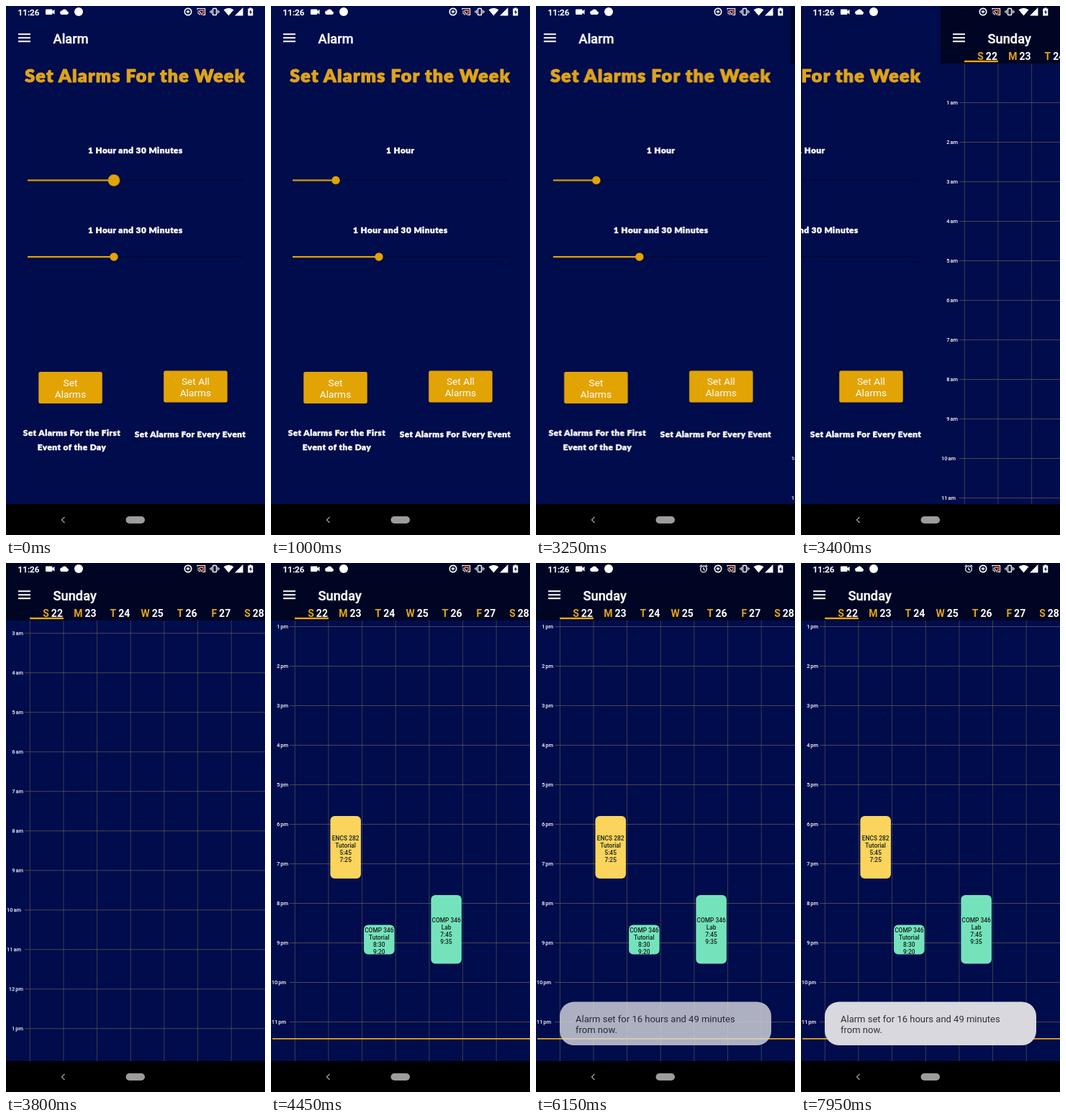
Recreate the animation shown at these times as an HTML page. Size 360 by 736 pixels, loop 8000 ms.

```html
<!DOCTYPE html>
<html lang="en">
<head>
<meta charset="utf-8">
<title>Weekly alarms</title>
<style>
html, body { margin: 0; width: 100%; height: 100%; overflow: hidden; background: #000; }
svg { display: block; width: 360px; height: 736px; font-family: Roboto, sans-serif; }
.round { font-family: Lato, "Open Sans", sans-serif; font-weight: 900; font-size: 11.8px; letter-spacing: .04em;
  fill: #fff; stroke: #fff; stroke-width: .5; stroke-linejoin: round; text-anchor: middle; }
.title { font-size: 25px; letter-spacing: .05em; fill: #dfa31b; stroke: #dfa31b; stroke-width: 1.1; }
.bar { font-size: 18.3px; font-weight: 500; fill: #fff; stroke: #fff; stroke-width: .35; }
.button { font-size: 13.7px; fill: #fff; text-anchor: middle; }
.day { font-size: 14px; font-weight: 700; fill: #fff; text-anchor: end; }
.day .letter { fill: #dfa31b; }
.hour { font-size: 7.5px; font-weight: 500; fill: #fff; text-anchor: end; }
.event { font-size: 8.4px; font-weight: 500; fill: #15201c; text-anchor: middle; }
.gold { fill: #e2a405; }

#pages, #scroll, #alarmIcon, #toast, .fill, .thumb, .label { animation: 8s linear infinite; }
.fill, .thumb, .label, #alarmIcon { animation-timing-function: step-end; }

#pages { animation-name: slide; }
@keyframes slide {
  0%, 40.27% { transform: none; animation-timing-function: cubic-bezier(.333, 0, .667, 1); }
  45%, 100% { transform: translateX(-360px); }
}
#scroll { animation-name: scroll; }
@keyframes scroll {
  0%, 45.25% { transform: none; animation-timing-function: cubic-bezier(.4, 0, .75, .6); }
  47.5% { transform: translateY(-145px); animation-timing-function: cubic-bezier(.33, .42, .6, 1); }
  52.5%, 100% { transform: translateY(-706px); }
}

#first .fill { animation-name: fill1; }
#first .thumb { animation-name: thumb1; }
#first .before { animation-name: hide1; }
#first .after { animation-name: show1; }
@keyframes fill1 { 0% { transform: scaleX(.4); } 6%, 100% { transform: scaleX(.2); } }
@keyframes thumb1 {
  0% { transform: translateX(120px) scale(1.45); }
  6% { transform: translateX(60px) scale(1.45); }
  11.25%, 100% { transform: translateX(60px); }
}
@keyframes hide1 { 0% { opacity: 1; } 6%, 100% { opacity: 0; } }
@keyframes show1 { 0% { opacity: 0; } 6%, 100% { opacity: 1; } }

#second .fill { animation-name: fill2; }
#second .thumb { animation-name: thumb2; }
#second .before { animation-name: hide2; }
#second .after { animation-name: show2; }
@keyframes fill2 {
  0% { transform: scaleX(.4); } 19.5% { transform: scaleX(.6); } 29.5%, 100% { transform: scaleX(.4); }
}
@keyframes thumb2 {
  0% { transform: translateX(120px); }
  16.5% { transform: translateX(120px) scale(1.45); }
  19.5% { transform: translateX(180px) scale(1.45); }
  29.5% { transform: translateX(120px) scale(1.45); }
  33%, 100% { transform: translateX(120px); }
}
@keyframes hide2 { 0% { opacity: 1; } 19.5% { opacity: 0; } 29.5%, 100% { opacity: 1; } }
@keyframes show2 { 0% { opacity: 0; } 19.5% { opacity: 1; } 29.5%, 100% { opacity: 0; } }

#alarmIcon { animation-name: ring; }
@keyframes ring { 0% { opacity: 0; } 69.5%, 100% { opacity: 1; } }
#toast { animation-name: toast; }
@keyframes toast { 0%, 74.75% { opacity: 0; } 77.4%, 100% { opacity: 1; } }
</style>
</head>
<body>
<svg viewBox="0 0 360 736">
  <defs>
    <path id="menu" d="M17 39.2H34M17 44.2H34M17 49.2H34" stroke="#fff" stroke-width="1.9"/>
  </defs>

  <g id="pages">
    <g id="alarmPage">
      <rect width="360" height="693" fill="#000c4b"/>
      <use href="#menu"/>
      <text class="bar" x="65.5" y="52">Alarm</text>
      <text class="round title" x="179.6" y="106">Set Alarms For the Week</text>
      <text class="round" x="91.5" y="597.5">Set Alarms For the First</text>
      <text class="round" x="91.5" y="617.5">Event of the Day</text>
      <text class="round" x="256" y="600">Set Alarms For Every Event</text>
    </g>
    <g transform="translate(360 0)">
      <rect width="360" height="693" fill="#000c4c"/>
      <path id="columns" stroke="#79714f" stroke-opacity=".5"/>
      <g id="scroll"></g>
      <g id="calendarHead">
        <rect width="360" height="80" fill="#000523"/>
        <use href="#menu"/>
        <text class="bar" x="65.5" y="52">Sunday</text>
        <rect x="33" y="75.8" width="47" height="2.4" fill="#eda610"/>
      </g>
    </g>
  </g>

  <g id="toast">
    <rect x="33" y="610.5" width="294" height="60.5" rx="20" fill="#d8d8de"/>
    <g font-size="13" fill="#303036">
      <text x="55" y="638.5">Alarm set for 16 hours and 49 minutes</text>
      <text x="55" y="653.5">from now.</text>
    </g>
  </g>

  <g id="status" fill="#fff">
    <text x="16.5" y="13" font-size="11.8" font-weight="500" stroke="#fff" stroke-width=".3">11:26</text>
    <path d="M56 4.5h7.5q1 0 1 1v1.7l3-2.5v7l-3-2.5v1.7q0 1-1 1H56q-1 0-1-1V5.5q0-1 1-1z"/>
    <path d="M78 12a2.7 2.7 0 0 1-.3-5.4A4 4 0 0 1 85 7.3a2.4 2.4 0 0 1 .1 4.7z"/>
    <circle cx="101" cy="8" r="6"/>
    <g id="alarmIcon" fill="none" stroke="#fff" stroke-width="1.2">
      <circle cx="233" cy="8.5" r="4.3"/>
      <path d="M233 6v2.8l2 1.3M227.8 5l2.5-2.2M238.2 5l-2.5-2.2"/>
    </g>
    <g fill="none" stroke="#fff">
      <circle cx="253" cy="8" r="4.7" stroke-width="1.7"/>
      <path d="M250.7 8h4.6M253 5.7v4.6" stroke-width="1.3"/>
      <path d="M266 5V3.500h10.500v9H273" stroke-width="1.2"/>
      <path d="M266 7a5.5 5.5 0 0 1 5.5 5.5M266 9.5a3 3 0 0 1 3 3" stroke-width="1.2"/>
      <path d="M268.5 6h5.5v4.5h-2" stroke="#e8673c" stroke-width="1.8"/>
      <rect x="287.5" y="3.5" width="5" height="9" rx=".8" stroke-width="1.4"/>
      <path d="M285.5 5.5v5M294.5 5.5v5M283.8 6.8v2.4M296.2 6.8v2.4" stroke-width="1.1"/>
    </g>
    <path d="M302.5 5.3Q309.5 .2 316.5 5.3L309.5 13.5z"/>
    <path d="M318 13.5L329.5 2v11.5z"/>
    <path d="M338.3 2.5h3v1h2v10h-7v-10h2z"/>
    <path d="M340.5 5l-2.5 4h1.6v3l2.4-4h-1.5z" fill="#000b4a"/>
  </g>

  <rect y="693" width="360" height="43"/>
  <path d="M81.5 711l-4 4 4 4" fill="none" stroke="#999" stroke-width="1.4"/>
  <rect x="166.5" y="710" width="26.5" height="10" rx="5" fill="#9c9c9f"/>
</svg>
<script>
const $ = id => document.getElementById(id);
const add = (id, markup) => $(id).insertAdjacentHTML("beforeend", markup);
const lines = (rows, x, y, step) =>
  rows.map((row, i) => `<text x="${x}" y="${y + i * step}">${row}</text>`).join("");

const slider = (id, labelY, y, after) => add("alarmPage", `
  <g id="${id}">
    <text class="round label before" x="179.8" y="${labelY}">1 Hour and 30 Minutes</text>
    <text class="round label after" x="179.8" y="${labelY}">${after}</text>
    <g transform="translate(30 ${y})">
      <rect y="-.8" width="300" height="1.6" fill="#00083b"/>
      <rect class="fill gold" y="-1.1" width="300" height="2.2"/>
      <circle class="thumb gold" r="5.7"/>
    </g>
  </g>`);
slider("first", 205, 242.5, "1 Hour");
slider("second", 315.8, 349, "2 Hours");

const button = (x, y, rows) => add("alarmPage", `
  <rect class="gold" x="${x}" y="${y}" width="88.5" height="44" rx="2.5"/>
  <g class="button">${lines(rows, x + 44.2, y + 19.5, 16)}</g>`);
button(45.3, 509, ["Set", "Alarms"]);
button(219.2, 507.5, ["Set All", "Alarms"]);

const column = i => 33.3 + i * 46.65;
let grid = "";
[..."SMTWTFS"].forEach((letter, i) => {
  grid += `M${column(i)} 80V693`;
  add("calendarHead", `<text class="day" x="${column(i + 1) - 1}" y="75"><tspan
    class="letter">${letter}</tspan><tspan dx="3">${22 + i}</tspan></text>`);
});
$("columns").setAttribute("d", grid);

// One hour is 55 px tall; midnight sits just under the header.
const hourY = h => 79 + h * 55;
for (let h = 1; h < 24; h++) {
  const n = h % 12 || 12, y = hourY(h);
  const right = n === 10 || n === 11 ? 21 : 24;
  add("scroll", `
    <path d="M26 ${y + .5}H360" stroke="#79714f" stroke-opacity=".6"/>
    <text class="hour" x="${right}" y="${y + 2.7}">${n}<tspan dx="1">${h < 12 ? "am" : "pm"}</tspan></text>`);
}

const event = (day, y, height, color, textY, rows) => {
  const x = column(day) + 2.5;
  add("scroll", `
    <rect x="${x}" y="${y}" width="42.5" height="${height}" rx="6" fill="${color}"/>
    <g class="event">${lines(rows, x + 21.2, textY, 10)}</g>`);
};
event(1, 1058, 87, "#fad45c", 1092, ["ENCS 282", "Tutorial", "5:45", "7:25"]);
event(2, 1209.5, 41, "#74e3bb", 1220, ["COMP 346", "Tutorial", "8:30", "9:20"]);
event(4, 1168, 95.5, "#74e3bb", 1206, ["COMP 346", "Lab", "7:45", "9:35"]);
add("scroll", `<rect x="2" y="1367" width="358" height="1.8" fill="#dfa31b"/>`);
</script>
</body>
</html>
```
